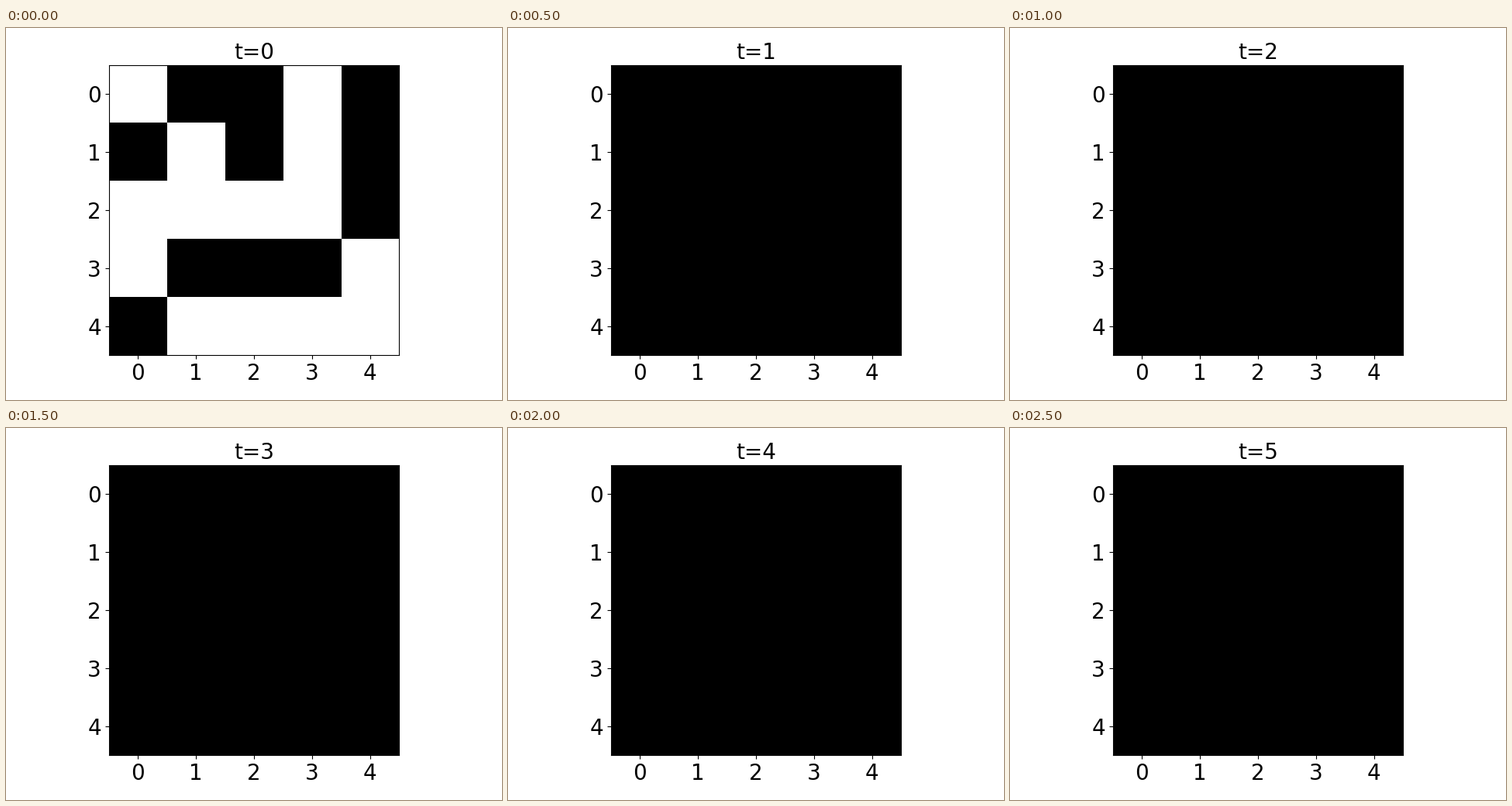
Write a matplotlib script that moves like this. It is 640 px wide and 480 px high and loops after 3000 ms.

```python
import matplotlib.pyplot as plt
import numpy as np
from matplotlib.animation import FuncAnimation

SIZE = 5
STEPS = 6
STEP_MS = 500


def start_grid():
    """Live (white) board with a few straight runs of dead (black) cells."""
    grid = np.ones((SIZE, SIZE))
    grid[0, 1:3] = 0
    grid[:2, 2] = 0
    grid[:3, -1] = 0
    grid[3, 1:-1] = 0
    grid[1::3, 0] = 0
    return grid


plt.rcParams.update({"font.family": "DejaVu Sans", "font.size": 20})

fig, ax = plt.subplots(figsize=(6.4, 4.8), dpi=100)
fig.subplots_adjust(left=0.1, right=0.9, bottom=0.12, top=0.9)
start = start_grid()
image = ax.imshow(start, cmap="gray", vmin=0, vmax=1,
                  interpolation="nearest")
ax.set_xticks(range(SIZE))
ax.set_yticks(range(SIZE))
title = ax.set_title("t=0", fontsize=20)


def draw(t):
    # every cell dies after the first step
    image.set_data(start * (t == 0))
    title.set_text(f"t={t}")
    return image, title


anim = FuncAnimation(fig, draw, frames=STEPS, interval=STEP_MS,
                     init_func=lambda: draw(0), repeat=True, repeat_delay=0)
plt.show()
```
